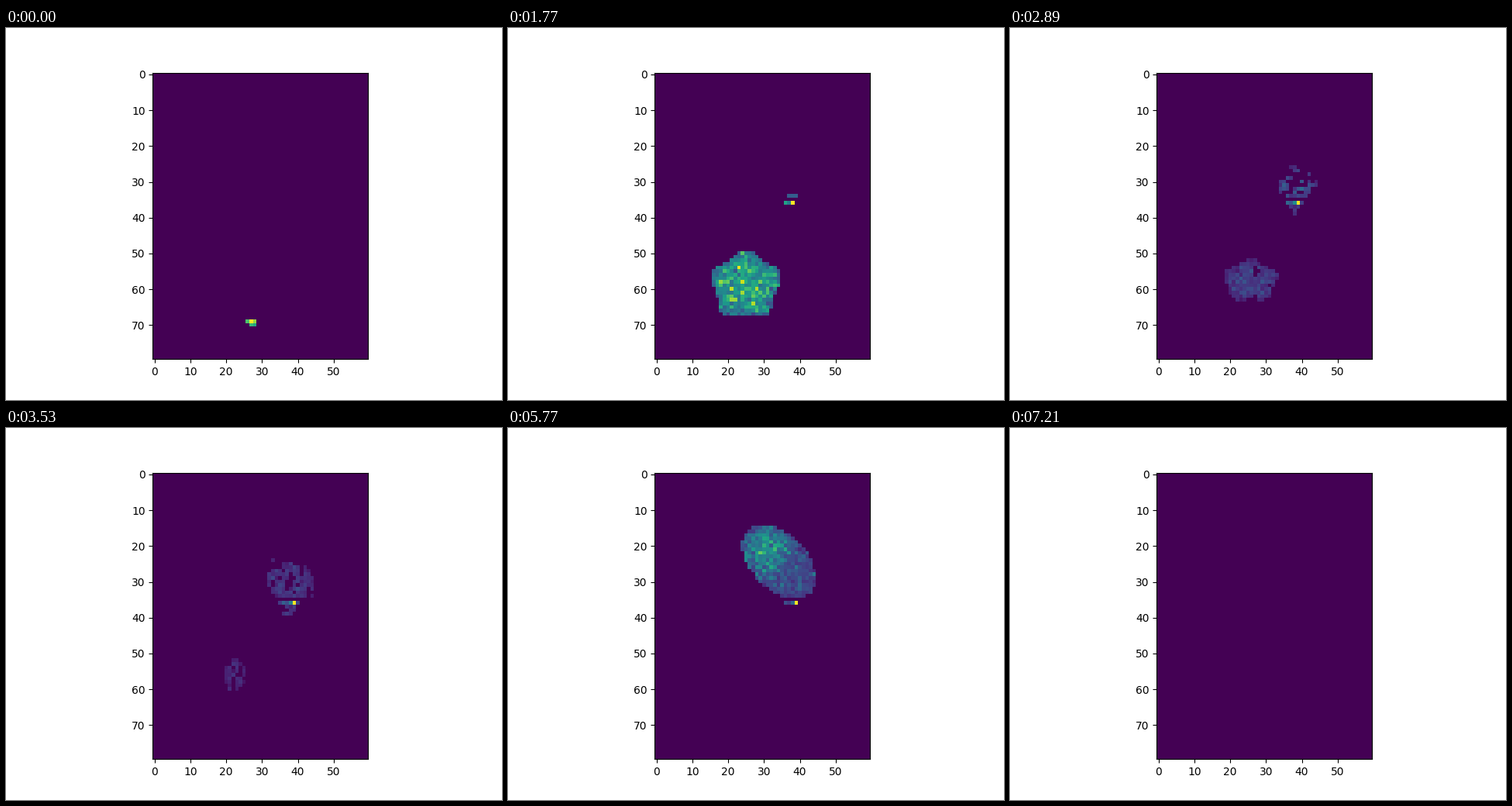
Write a matplotlib script that moves like this. It is 640x480 px and loops after 8 s.

```python
import numpy as np
import matplotlib.pyplot as plt
from matplotlib.animation import FuncAnimation

ROWS, COLS = 80, 60
STEPS, STEP_MS = 50, 160
LAST = 44          # last step with any activity
HOT = (36, 39)     # the cell that outshines all others
HOT_STEPS = range(13, 37)

# step, centre col, centre row, two half axes
LOWER = [(1, 25, 66.8, 7.3, 3.1), (11, 25, 59, 9.4, 9.1), (18, 25.8, 57.7, 7.2, 5.7),
         (22, 22.5, 56.3, 3, 4.6), (27, 22, 55, .5, .5)]
UPPER = [(18, 39, 31.5, 6.5, 5), (23, 37.6, 29.5, 8, 6), (30, 34.9, 26.6, 11.2, 6.9),
         (36, 34.1, 24.4, 12.4, 7.7), (44, 32, 15.5, 2.6, 2.2)]

yy, xx = np.mgrid[:ROWS, :COLS]
rng = np.random.default_rng(11)
grain = rng.normal(0, .22, (ROWS, COLS))

# Clustered noise, ranked evenly from 0 to 1
rough = rng.random((ROWS, COLS))
rough += .35 * sum(np.roll(rough, d, a) for d in (-1, 1) for a in (0, 1))
rank = rough.ravel().argsort().argsort().reshape(ROWS, COLS) / rough.size

# The upper patch spreads outwards from its lower right part
onset = 13.5 + .5 * np.hypot(xx - 39.5, yy - 32) + 10 * rank


def ramp(step, *keys):
    return np.interp(step, *zip(*keys))


def pose(step, keys):
    times, *tracks = zip(*keys)
    return [np.interp(step, times, track) for track in tracks]


def reach(step, keys, tilt=0, wobble=0):
    """Relative distance from the centre; 1 lies on the outline."""
    cx, cy, a, b = pose(step, keys)
    c, s = np.cos(tilt), np.sin(tilt)
    u = (c * (xx - cx) + s * (yy - cy)) / a
    v = (c * (yy - cy) - s * (xx - cx)) / b
    lobes = np.cos(5 * (np.arctan2(v, u) - np.radians(55)))
    return np.hypot(u, v) / (1 + wobble * lobes)


def spark():
    d = np.hypot(xx - 27.2, 1.7 * (yy - 69.2))
    return np.where(d < 1.7, 1.13 - .33 * d, 0)


def lower(step):
    d = reach(step, LOWER, wobble=.09)
    density = ramp(step, (13, 1), (18, .93), (22, .65), (27, 0))
    level = ramp(step, (12, .5), (13, .38), (18, .18), (22, .11))
    return np.where((d < 1) & (rank < density), level * (1 - .5 * d ** 6), 0)


def upper(step):
    d = reach(step, UPPER, tilt=np.pi / 4)
    level = ramp(step, (18, .2), (22, .14), (30, .14), (36, .22), (37, .42), (44, .48))
    glow = ramp(step, (30, 0), (36, 1.4), (37, .5), (44, 0))
    core = np.exp(-((xx - 30) ** 2 + (yy - 20.5) ** 2) / 45)
    shade = (1 + glow * core) * (1 - .3 * d ** 6)
    return np.where((d < 1) & (yy < 35) & (onset <= step), level * shade, 0)


def source(step):
    """Two short slanted rows beside the hot cell, with a loose cluster below."""
    rows = (abs(xx - 37.5 + .5 * (yy - 35)) <= 1) & (abs(yy - 35) == 1)
    level = ramp(step, (10, .62), (18, .35), (36, .22))
    data = np.where(rows, np.where(yy == 36, level, level / 2), 0)
    d = np.hypot((xx - 37.5) / 3.5, (yy - 37.3) / 2.2)
    density = ramp(step, (14, 0), (22, .45), (30, .75), (34, .75), (35, 0))
    return np.maximum(data, .15 * ((d < 1) & (yy > 35) & (rank < density)))


def field(i):
    step = 1 if i == 2 else i  # the second picture is held for two steps
    if step == 0:
        return spark()
    data = np.zeros((ROWS, COLS))
    if step > LAST:
        return data
    if step < 27:
        data = lower(step)
    if 10 <= step <= HOT_STEPS[-1]:
        data = np.maximum(data, source(step))
    if step > 13:
        data = np.maximum(data, upper(step))
    flicker = np.random.default_rng(100 + step).normal(0, .1, (ROWS, COLS))
    data = data * np.exp(grain + flicker)
    if step in HOT_STEPS:
        data[HOT] = 1
    return data / data.max()


fig, ax = plt.subplots(figsize=(6.4, 4.8), dpi=100)
image = ax.imshow(field(0), cmap="viridis", vmin=0, vmax=1)


def update(i):
    image.set_data(field(i))
    return [image]


anim = FuncAnimation(fig, update, frames=STEPS, interval=STEP_MS,
                     repeat=True, repeat_delay=0)
plt.show()
```
